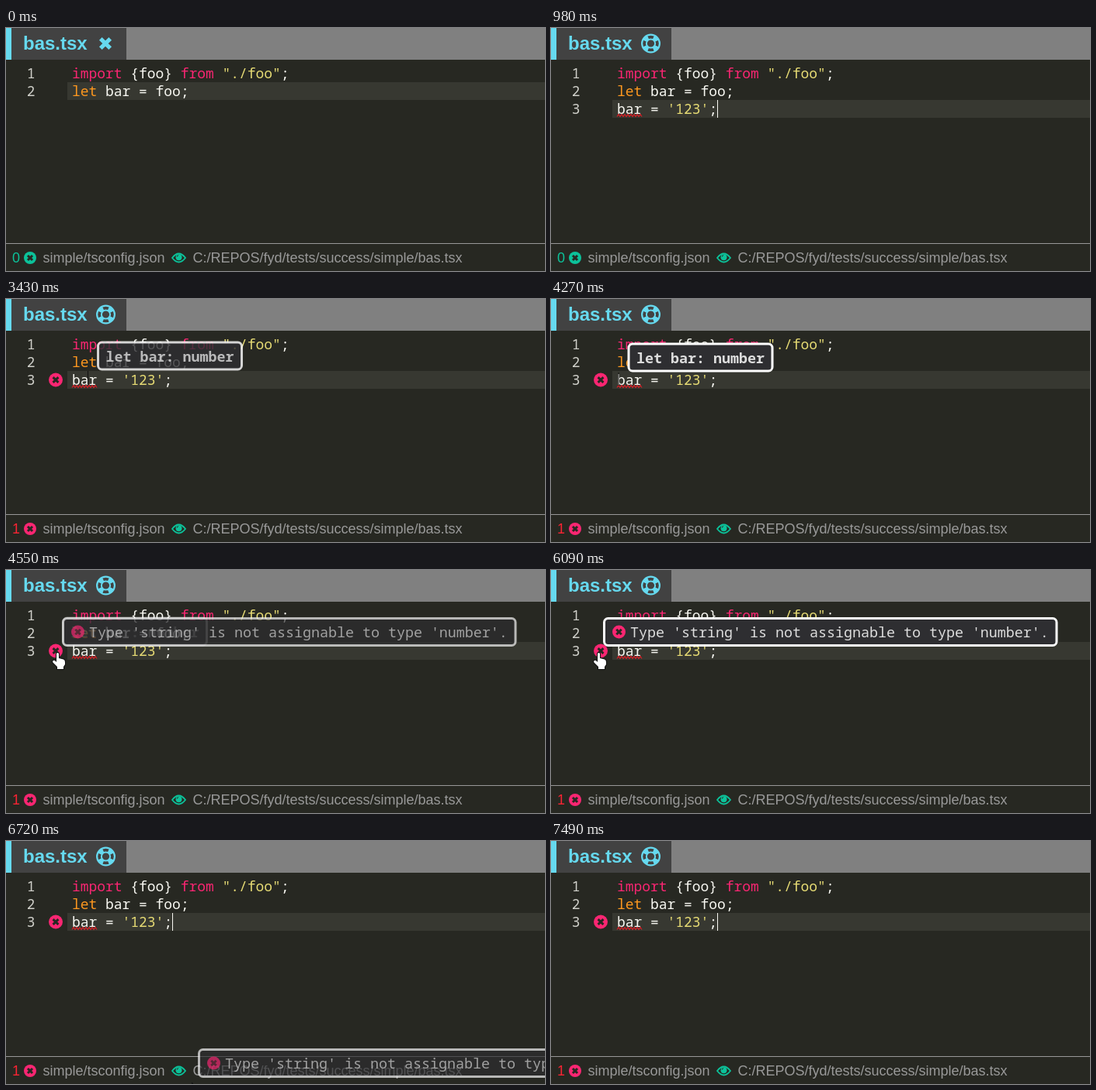
These frames come from a looping animation (694x314 px, 7560 ms). An HTML page with a canvas:

```html
<!DOCTYPE html>
<html lang="en">
<head>
<meta charset="utf-8">
<title>Editor error tooltip</title>
<style>
html, body { margin: 0; width: 100%; height: 100%; overflow: hidden; background: #272822; }
canvas { display: block; }
</style>
</head>
<body>
<canvas id="stage" width="694" height="314"></canvas>
<script>
const c = document.getElementById('stage').getContext('2d');
const LOOP = 7560, STEP = 70, CHAR = 10.75;
const BG = '#272822', CYAN = '#66d9ef', PINK = '#f92672', WHITE = '#f8f8f2',
      YELLOW = '#e6db74', ORANGE = '#fd971f', GREEN = '#0cc29a', GRAY = '#999';
const mono = (size, weight = 500) => `${weight} ${size}px "Noto Sans Mono", monospace`;
const sans = (size, weight = 400) => `${weight} ${size}px "Liberation Sans", Arial, sans-serif`;
const CODE = mono(CHAR / 0.6), TIP = 11 / 0.6;

const LINES = [
  [['import', PINK], [' {foo} ', WHITE], ['from', PINK], [' ', WHITE], ['"./foo"', YELLOW], [';', WHITE]],
  [['let', ORANGE], [' bar = foo;', WHITE]],
  [['bar = ', WHITE], ["'123'", YELLOW], [';', WHITE]]
];
// times at which the caret switches on or off
const CARET = [280, 1400, 1820, 2310, 2730, 3220, 3710, 4200, 4620, 5110, 5600, 6090, 6580, 7000, 7490];
// pointer path: time, x, y
const MOUSE = [[2870, 66, 296], [2940, 80, 220], [3010, 100, 140], [3080, 110, 104], [3150, 110, 101],
  [4200, 110, 101], [4340, 73, 105], [4550, 65, 107], [4620, 60, 107], [6440, 60, 107],
  [6510, 95, 124], [6580, 174, 171], [6650, 215, 240], [6720, 240, 314]];

const ARROW = new Path2D('M0 0V16L4 12.5 6.5 18 9 17 6.5 11.5H11.5Z');
const HAND = new Path2D('M0 1Q1.5-1 3 1V7L9 8.5Q11 9 11 12V15L9 18V21H1V18L-5 12Q-5 9-2 10L0 12Z');
const EYE = new Path2D('M-8.5 0Q0-11 8.5 0Q0 11-8.5 0Z');

const ramp = (t, a, b) => Math.min(1, Math.max(0, (t - a) / (b - a)));

function text(s, x, y, color, font, align = 'left') {
  c.font = font;
  c.fillStyle = color;
  c.textAlign = align;
  c.fillText(s, x, y);
}

function rect(x, y, w, h, color) {
  c.fillStyle = color;
  c.fillRect(x, y, w, h);
}

function arc(x, y, r, color, width, from = 0, to = Math.PI * 2) {
  c.beginPath();
  c.arc(x, y, r, from, to);
  c.strokeStyle = c.fillStyle = color;
  c.lineWidth = width;
  width ? c.stroke() : c.fill();
}

function cross(x, y, r, color, width) {
  c.beginPath();
  c.moveTo(x - r, y - r); c.lineTo(x + r, y + r);
  c.moveTo(x + r, y - r); c.lineTo(x - r, y + r);
  c.strokeStyle = color;
  c.lineWidth = width;
  c.stroke();
}

function badge(x, y, r, color) {
  arc(x, y, r, color, 0);
  cross(x, y, r * 0.38, BG, 3);
}

function lifeRing(x, y) {
  arc(x, y, 11.4, CYAN, 2.2);
  arc(x, y, 5.6, CYAN, 2);
  for (let i = 0; i < 4; i++) {
    const a = Math.PI * (i / 2 + 0.25);
    arc(x, y, 8.5, CYAN, 6, a - 0.38, a + 0.38);
  }
}

function header(dirty) {
  rect(0, 0, 694, 41, '#808080');
  rect(0, 0, 155, 41, '#424242');
  rect(0, 0, 7, 41, CYAN);
  text('bas.tsx', 22, 28, CYAN, sans(24, 700));
  dirty ? lifeRing(128.5, 20) : cross(128, 20, 6.2, CYAN, 5.2);
}

function codeLine(row, limit = 99) {
  const y = 65 + row * 23;
  let col = 0;
  text(row + 1, 37.5, y, '#d0d0ca', CODE, 'right');
  for (const [s, color] of LINES[row]) {
    text(s.slice(0, Math.max(0, limit - col)), 85 + col * CHAR, y, color, CODE);
    col += s.length;
  }
}

function squiggle() {
  c.beginPath();
  for (let x = 85; x <= 117; x += 2) c.lineTo(x, x % 4 == 1 ? 114.5 : 111.5);
  c.strokeStyle = '#e01b24';
  c.lineWidth = 1.1;
  c.stroke();
}

function editor(t) {
  const typing = t >= 280;
  const typed = t >= 980 ? 12 : Math.floor(11 * ramp(t, 280, 770));
  rect(79, typing ? 93 : 70, 615, 23, '#373831');
  codeLine(0);
  codeLine(1);
  if (typing) codeLine(2, typed);
  if (t >= 980) squiggle();
  if (t >= 1260) badge(64, 104.5, 9, PINK);
  if (CARET.filter(k => k <= t).length % 2) rect(Math.round(85 + typed * CHAR), 93, 1, 23, WHITE);
}

function status(failed) {
  rect(0, 278, 694, 1, GRAY);
  text(failed ? '1' : '0', 8, 303, failed ? '#fb2433' : GREEN, sans(18));
  badge(31, 297, 8, failed ? PINK : GREEN);
  text('simple/tsconfig.json', 47.5, 303, GRAY, sans(18));
  c.save();
  c.translate(222.5, 297);
  c.strokeStyle = GREEN;
  c.lineWidth = 1.8;
  c.stroke(EYE);
  arc(0, -0.8, 4, GREEN, 0);
  arc(-0.5, -1.5, 1.7, BG, 1, Math.PI, Math.PI * 1.5);
  c.restore();
  text('C:/REPOS/fyd/tests/success/simple/bas.tsx', 240.5, 303, GRAY, sans(18));
}

function tooltip(x, y, message, weight, alpha, icon) {
  if (alpha <= 0) return;
  const lead = icon ? 35 : 11.5;
  const w = lead + message.length * 11 + 11.5;
  c.globalAlpha = alpha;
  c.beginPath();
  c.roundRect(x + 1.5, y + 1.5, w - 3, 35, 5);
  c.fillStyle = '#2e2e31';
  c.fill();
  c.strokeStyle = '#fff';
  c.lineWidth = 3;
  c.stroke();
  if (icon) badge(x + 20.5, y + 19, 8.5, PINK);
  text(message, x + lead, y + 26, '#ddd', mono(TIP, weight));
  c.globalAlpha = 1;
}

function pointAt(t) {
  const i = MOUSE.findIndex(k => k[0] > t);
  if (i < 0) return MOUSE[MOUSE.length - 1].slice(1);
  const [t0, x0, y0] = MOUSE[Math.max(0, i - 1)], [t1, x1, y1] = MOUSE[i];
  const p = ramp(t, t0, t1);
  return [x0 + (x1 - x0) * p, y0 + (y1 - y0) * p];
}

function pointer(x, y) {
  if (y < 116 && x > 75) {
    rect(x - 5, y - 8, 1, 17, '#111');
    return;
  }
  const shape = y < 116 ? HAND : ARROW;
  c.save();
  c.translate(x, y);
  c.strokeStyle = '#111';
  c.lineWidth = 2;
  c.stroke(shape);
  c.fillStyle = '#fff';
  c.fill(shape);
  c.restore();
}

function draw(t) {
  rect(0, 0, 694, 314, BG);
  header(t >= 280);
  editor(t);
  status(t >= 1330);
  if (t < 2870 || t > 7000) return;
  const [x, y] = pointAt(t);
  const swap = ramp(t, 4270, 4690);
  tooltip(x + 7, y - 46.5, 'let bar: number', 700, ramp(t, 3150, 3500) - swap);
  tooltip(x + 7, y - 46, "Type 'string' is not assignable to type 'number'.", 400,
    swap - ramp(t, 6580, 7000), true);
  pointer(x, y);
}

function tick() {
  draw(Math.floor(performance.now() % LOOP / STEP) * STEP);
  requestAnimationFrame(tick);
}
tick();
</script>
</body>
</html>
```
